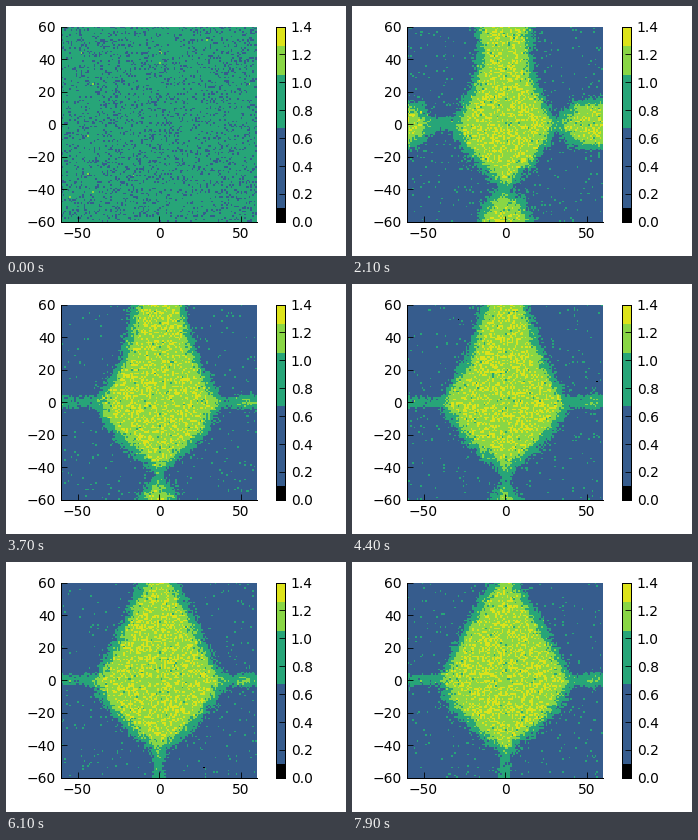
Animation, 340 px wide and 250 px high, one loop 8 s. Source, as a matplotlib script:

```python
import numpy as np
import matplotlib.pyplot as plt
from matplotlib.animation import FuncAnimation
from matplotlib.colors import BoundaryNorm, ListedColormap

W, H, DPI = 340, 250, 100
FRAMES, STEP = 80, 100
N = 120
T0 = 1.1  # phases are fully separated from here on (s)

plt.rcParams.update({
    "font.family": "DejaVu Sans", "font.size": 10,
    "axes.linewidth": 0.72,
    "xtick.direction": "in", "ytick.direction": "in",
    "xtick.major.size": 4, "ytick.major.size": 4,
    "xtick.major.width": 0.6, "ytick.major.width": 0.6,
    "xtick.major.pad": 4, "ytick.major.pad": 4,
})

cmap = ListedColormap(["#000000", "#365c8d", "#27a578", "#89d645", "#dde31a"])
norm = BoundaryNorm([-9, 0.1, 0.67, 1.05, 1.26, 9], cmap.N)

axis = np.linspace(-60, 60, N, endpoint=False) + 0.5
X, Y = np.meshgrid(axis, axis)


def blur(a, r):
    for ax in (0, 1):
        a = sum(np.roll(a, k, ax) for k in range(-r, r + 1)) / (2 * r + 1)
    return a


lumps = blur(blur(np.random.default_rng(7).normal(size=(N, N)), 4), 4)
lumps /= lumps.std()


def ramp(t, start, span):
    return np.clip((t - start) / span, 0, 1)


def mix(a, b, s):
    return a + (b - a) * s


def body(t):
    """Signed distance to a bell with a neck that turns into a kite."""
    grow, taper = ramp(t, T0, 2), ramp(t, 3.1, 4.8) ** 0.75
    wide = 21.5 + 12 * grow + 3.5 * taper
    neck = mix(9, 15.5, grow)
    up, down = np.maximum(axis, 0), np.maximum(-axis, 0)

    bell = neck + (wide - neck) * np.exp(-(up / 21) ** 1.5)
    kite = wide * (1 - up / 62) ** 0.78
    tail = wide * (1 - (down / (34 + 5 * grow + 3 * taper)) ** 1.6)
    half = np.where(axis > 0, mix(bell, kite, taper), tail)
    slope = np.gradient(half, axis)
    return (half[:, None] - np.abs(X)) / np.hypot(1, slope)[:, None]


def drop(t, cx, cy, rx, ry, life):
    """Signed distance to an evaporating ellipse on the periodic plane."""
    dx = (X - cx + 60) % 120 - 60
    dy = (Y - cy + 60) % 120 - 60
    size = np.sqrt(1 - ramp(t, T0, life))
    return min(rx, ry) * (size - np.hypot(dx / rx, dy / ry))


def density(i):
    rng = np.random.default_rng(100 + i)
    t = i * STEP / 1000
    early = 1 - ramp(t, 0, T0)

    d = np.maximum.reduce([body(t),
                           drop(t, 0, 53, 16, 24, 4),
                           drop(t, 54, 0, 24, 18, 1.8)])
    d = d * (1 - 0.6 * early) + 9 * early * lumps
    d += 3 * blur(rng.normal(size=(N, N)), 2)
    dense = 1 / (1 + np.exp(-np.clip((d + 2.2) / 1.9, -30, 30)))

    # Thin arms along both axes, flaring where they meet the body
    arm = np.maximum(np.exp(-(Y / mix(4.3, 3.4, ramp(t, T0, 3))) ** 4),
                     np.exp(-(X / 3.2) ** 4))
    dense = 1 - (1 - dense) * (1 - 0.45 * arm * (1 - early))

    s = ramp(t, 0, 0.6)
    dilute = 0.47 + 0.035 * np.exp(-max(0, t - T0))
    mean = mix(0.76, dilute + (1.23 - dilute) * dense, s * s * (3 - 2 * s))
    seam = (np.abs(X - 0.5) < 0.6) | (np.abs(Y - 0.5) < 0.6)
    mean -= 0.07 * dense * s * seam
    return mean + (0.1 - 0.02 * dense) * rng.normal(size=(N, N))


def place(x0, y0, x1, y1):
    return fig.add_axes([x0 / W, 1 - y1 / H, (x1 - x0) / W, (y1 - y0) / H])


fig = plt.figure(figsize=(W / DPI, H / DPI), dpi=DPI, facecolor="white")

ax = place(55.2, 20.6, 251, 215.8)
img = ax.imshow(density(0), cmap=cmap, norm=norm, origin="lower",
                extent=(-60, 60, -60, 60), interpolation="nearest",
                aspect="auto")
ax.spines[["top", "right"]].set_visible(False)
ax.set_xticks([-50, 0, 50])
ax.set_yticks(range(-60, 61, 20))

bar = place(270.2, 20.6, 279.2, 215.8)
bar.imshow(np.linspace(0, 1.4, 560)[:, None], cmap=cmap, norm=norm,
           origin="lower", extent=(0, 1, 0, 1.4), interpolation="nearest",
           aspect="auto")
bar.set_xticks([])
bar.yaxis.tick_right()
bar.set_yticks(np.arange(8) * 0.2)
bar.yaxis.set_major_formatter("{x:.1f}")


def update(i):
    img.set_data(density(i))
    return [img]


anim = FuncAnimation(fig, update, frames=FRAMES, interval=STEP,
                     repeat=True, repeat_delay=0, blit=False)
plt.show()
```
